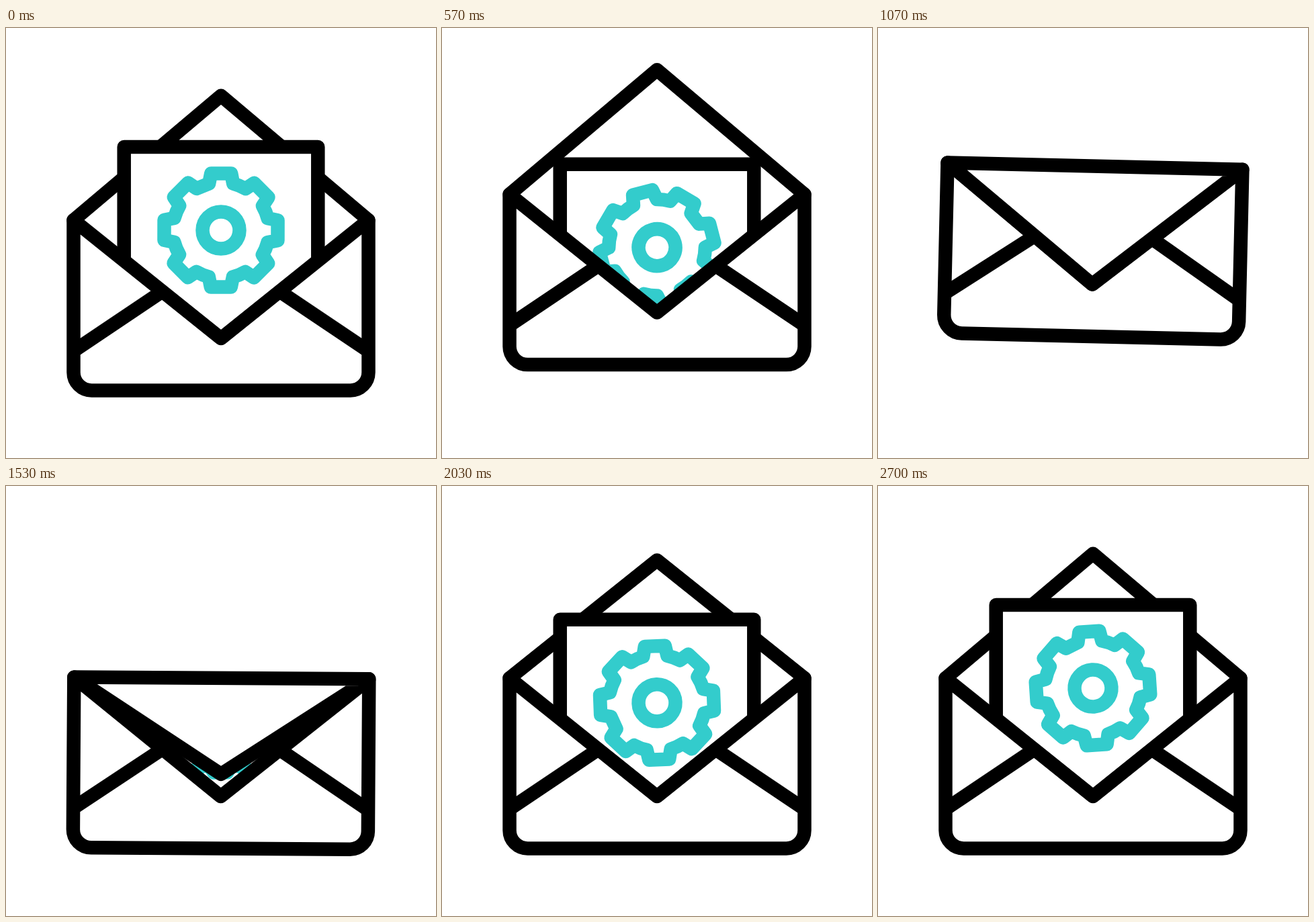
Animation, 640 px wide and 640 px high, one loop 2.73 s. Source, as an HTML page with a canvas:

```html
<!DOCTYPE html>
<html lang="en">
<head>
<meta charset="utf-8">
<title>Envelope with gear letter</title>
<style>
  html, body { margin: 0; width: 100%; height: 100%; overflow: hidden; background: #fff; }
  canvas { display: block; width: 640px; height: 640px; }
</style>
</head>
<body>
<canvas id="stage" width="640" height="640"></canvas>
<script>
const LOOP = 2730;
const TEAL = '#33cccc';
const SHOULDER = 286, FLAP_OPEN = 100.75, FLAP_SHUT = 462;
const ctx = document.getElementById('stage').getContext('2d');

const body = new Path2D(
  'M100.5 286V512.5A27 27 0 0 0 127.5 539.5H512.5A27 27 0 0 0 539.5 512.5V286L320 462Z');
const folds = new Path2D('M104 478.5L232 392.5M536 478.5L408 392.5');
const pocketMouth = new Path2D('M80 -300H560V286H539.5L320 462L100.5 286H80Z');
const sheet = new Path2D('M175.7 177H464.3V640H175.7Z');
const gear = makeGear();

function makeGear() {
  const tooth = [[-18, -69.5], [-15, -84.5], [15, -84.5], [18, -69.5]];
  let d = '';
  for (let i = 0; i < 8; i++) {
    const c = Math.cos(i * Math.PI / 4), s = Math.sin(i * Math.PI / 4);
    tooth.forEach(([x, y], j) => {
      const command = j ? 'L' : i ? 'A72 72 0 0 1 ' : 'M';
      d += `${command}${x * c - y * s} ${x * s + y * c}`;
    });
  }
  const path = new Path2D(d + 'Z');
  path.moveTo(27.5, 0);
  path.arc(0, 0, 27.5, 0, 2 * Math.PI);
  return path;
}

const progress = (t, from, to) => Math.min(1, Math.max(0, (t - from) / (to - from)));
const smooth = u => u * u * (3 - 2 * u);

// Eased interpolation through [time, value] keys.
function track(t, keys) {
  let value = keys[0][1];
  for (let i = 1; i < keys.length; i++) {
    const [from, a] = keys[i - 1], [to, b] = keys[i];
    if (t >= from) value = a + (b - a) * smooth(progress(t, from, to));
  }
  return value;
}

function paint(path, filled = true) {
  if (filled) ctx.fill(path);
  ctx.stroke(path);
}

function drawFlap(apex) {
  const path = new Path2D(`M100.5 ${SHOULDER}L320 ${apex}L539.5 ${SHOULDER}`);
  if (apex > SHOULDER) path.closePath();
  paint(path);
}

function drawLetter(t) {
  const drop = t < 1300
    ? 235 * progress(t, 253, 1215) ** 2
    : track(t, [[1300, 235], [2200, 0]]);
  ctx.save();
  ctx.clip(pocketMouth);
  ctx.setTransform(1, 0, 0, 1, 0, drop);
  paint(sheet);
  ctx.translate(320, 301);
  ctx.rotate(2 * Math.PI * t / LOOP);
  ctx.strokeStyle = TEAL;
  paint(gear, false);
  ctx.restore();
}

function draw(t) {
  const lift = track(t, [[0, 0], [333, 18], [767, -80.5], [1233, -80.5], [1533, 0]]);
  const tilt = track(t, [[767, 0], [933, 6], [1240, -5], [1400, 3], [1567, 0]]);
  const apex = track(t, [[575, FLAP_OPEN], [1067, FLAP_SHUT], [1400, FLAP_SHUT], [2100, FLAP_OPEN]]);
  const shut = apex > SHOULDER;

  ctx.setTransform(1, 0, 0, 1, 0, 0);
  ctx.fillStyle = '#fff';
  ctx.strokeStyle = '#000';
  ctx.lineWidth = 20.5;
  ctx.lineJoin = ctx.lineCap = 'round';
  ctx.fillRect(0, 0, 640, 640);

  ctx.translate(320, 413 + lift);
  ctx.rotate(tilt * Math.PI / 180);
  ctx.translate(-320, -413);

  if (!shut) drawFlap(apex);
  drawLetter(t);
  paint(body);
  paint(folds, false);
  if (shut) drawFlap(apex);
}

function frame() {
  draw(performance.now() % LOOP);
  requestAnimationFrame(frame);
}
frame();
</script>
</body>
</html>
```
